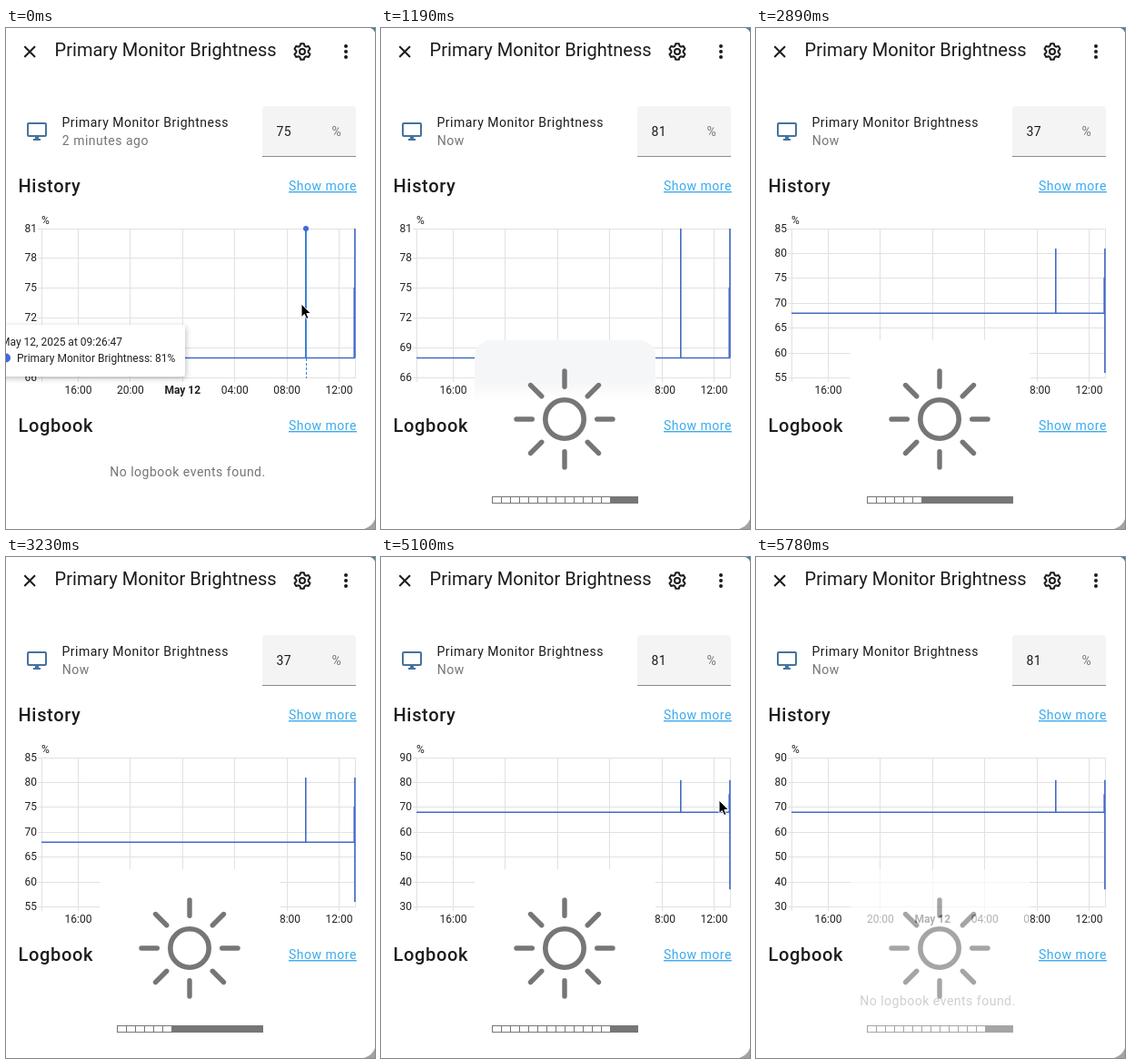
An HTML page that plays this animation: 406x552 px, repeating every 5.95 s.

```html
<!DOCTYPE html>
<html lang="en">
<head>
<meta charset="utf-8">
<title>Brightness history</title>
<style>
  html, body { margin: 0; width: 100%; height: 100%; overflow: hidden; background: #fff; }
  svg { display: block; width: 406px; height: 552px; font: 14px Roboto, sans-serif; letter-spacing: .5px; fill: #1c1c1c; }
  .title { font-size: 20px; letter-spacing: .02px; }
  .head { font-size: 20px; font-weight: 500; letter-spacing: .65px; }
  .soft { fill: #757575; }
  .link { fill: #3aabee; text-decoration: underline; }
  .small { font-size: 12px; letter-spacing: 0; fill: #222; }
  .mid { text-anchor: middle; }
  .end { text-anchor: end; }
  .bold { font-weight: 700; }
  .grid { stroke: #e1e1e1; fill: none; }
  .line { stroke: #4269c8; stroke-width: 1.6; fill: none; }
  .icon { stroke: #1c1c1c; stroke-width: 2; fill: none; }
</style>
</head>
<body>
<svg viewBox="0 0 406 552">
  <defs>
    <linearGradient id="frost" x1="0" y1="344" x2="0" y2="412" gradientUnits="userSpaceOnUse">
      <stop offset=".65" stop-color="#f5f6f7"/>
      <stop offset="1" stop-color="#fff"/>
    </linearGradient>
    <filter id="shadow" x="-10%" y="-25%" width="120%" height="160%">
      <feDropShadow dx="1" dy="2" stdDeviation="3" flood-opacity=".25"/>
    </filter>
  </defs>

  <rect width="406" height="552" fill="#fff"/>
  <path d="M401 0Q405 1.5 406 5V0Z" fill="#4583a0"/>
  <path d="M406 541Q403 549 394 552H406Z" fill="#a3a3a3"/>

  <path class="icon" d="M20.3 20.3L32 32M32 20.3L20.3 32"/>
  <text class="title" x="53.6" y="31">Primary Monitor Brightness</text>
  <g class="icon" transform="translate(326 26)">
    <path id="cog" stroke-linejoin="round"/>
    <circle r="3"/>
  </g>
  <circle cx="374" cy="20" r="2"/>
  <circle cx="374" cy="26" r="2"/>
  <circle cx="374" cy="32" r="2"/>

  <g fill="none" stroke="#44739e" stroke-width="2">
    <rect x="24" y="105" width="20" height="14" rx="1"/>
    <path d="M34 119V123M30 123H38" />
    <path d="M34 120V123" stroke-width="4"/>
  </g>
  <text x="61.5" y="109">Primary Monitor Brightness</text>
  <text id="ago" class="soft" x="61.8" y="129"></text>
  <path d="M282 141V90Q282 86 286 86H381Q385 86 385 90V141Z" fill="#f4f4f4"/>
  <path d="M282 141.5H385" stroke="#8c8c8c"/>
  <text id="value" x="297.5" y="119"></text>
  <text class="soft" x="358.5" y="119">%</text>

  <text class="head" x="13.5" y="181">History</text>
  <text class="link" x="311" y="179">Show more</text>
  <text class="small" x="39" y="216">%</text>
  <g id="times"></g>
  <g id="chart"></g>
  <text class="head" x="13.5" y="445">Logbook</text>
  <text class="link" x="311" y="443">Show more</text>
  <text class="soft mid" x="200" y="494">No logbook events found.</text>

  <g id="tip">
    <path d="M330 221V364" stroke="#2f83d6" stroke-width="1.6"/>
    <path d="M330.5 364V386" stroke="#2f83d6" stroke-dasharray="3 2"/>
    <circle cx="330" cy="221" r="3" fill="#4269d8"/>
    <rect x="-16" y="327" width="213" height="57" rx="4" fill="#fff" filter="url(#shadow)"/>
    <text class="small" x="-6" y="350">May 12, 2025 at 09:26:47</text>
    <circle cx="0" cy="363.5" r="5" fill="#4269d8"/>
    <text class="small" x="12" y="368">Primary Monitor Brightness: 81%</text>
  </g>

  <g id="osd">
    <rect id="panel" x="103" y="344" width="199" height="199" rx="18"/>
    <circle cx="202" cy="431" r="21.2" fill="none" stroke="#767676" stroke-width="5.6"/>
    <path id="rays" transform="translate(202 431)" stroke="#767676" stroke-width="5.4" stroke-linecap="round"/>
    <rect x="122" y="516" width="161" height="8" fill="#767676"/>
    <g id="cells"></g>
  </g>

  <path id="cursor" d="M0 0V14.6L3.3 11.5L5.6 16.6L8 15.6L5.8 10.6H10.4Z" fill="#000" stroke="#fff"/>
</svg>

<script>
const $ = id => document.getElementById(id);
const range = n => [...Array(n).keys()];
const TICK = 170, LOOP = 5950;
const LEFT = 39, RIGHT = 385, TOP = 221, BOTTOM = 385.5;

// Axis limits, label step and lowest value plotted at the right edge
const charts = [
  { min: 66, max: 81, step: 3, low: 68 },
  { min: 55, max: 85, step: 5, low: 56 },
  { min: 30, max: 90, step: 10, low: 37 }
];

// [tick, changed properties]
const steps = [
  [0, { value: 75, ago: '2 minutes ago', level: 13, osd: 0, chart: 0, cursor: [325, 304], tip: 1 }],
  [1, { cursor: [349, 336], tip: .5 }],
  [2, { cursor: [380, 398], tip: 0 }],
  [3, { cursor: null, osd: 1 }],
  [7, { value: 81, ago: 'Now' }],
  [9, { level: 12 }],
  [10, { value: 75 }],
  [11, { level: 11 }],
  [12, { value: 69 }],
  [13, { level: 10 }],
  [14, { value: 62 }],
  [15, { level: 9, value: 56 }],
  [16, { level: 7, value: 50, chart: 1 }],
  [17, { level: 6, value: 37 }],
  [20, { chart: 2 }],
  [21, { level: 7 }],
  [23, { level: 8, value: 43 }],
  [24, { level: 9, value: 50 }],
  [25, { level: 10, value: 56 }],
  [26, { level: 12, value: 62 }],
  [27, { level: 13, value: 75 }],
  [28, { value: 81 }],
  [30, { cursor: [372, 268] }],
  [31, { cursor: [386, 240] }],
  [32, { cursor: [401, 205] }],
  [33, { cursor: null, osd: .9 }],
  [34, { osd: .65 }]
];

const polar = (r, deg) => {
  const a = deg * Math.PI / 180;
  return `${(r * Math.sin(a)).toFixed(2)} ${(-r * Math.cos(a)).toFixed(2)}`;
};

function drawStatic() {
  const teeth = range(6).flatMap(i =>
    [[6.6, -23], [9, -11], [9, 11], [6.6, 23]].map(([r, a]) => polar(r, i * 60 + a)));
  $('cog').setAttribute('d', `M${teeth.join('L')}Z`);
  $('rays').setAttribute('d', range(8).map(i => `M${polar(35.7, i * 45)}L${polar(53, i * 45)}`).join(''));
  $('times').innerHTML = ['16:00', '20:00', 'May 12', '04:00', '08:00', '12:00'].map((label, i) => {
    const x = 79.5 + i * 57.4;
    return `<path class="grid" d="M${Math.floor(x) + .5} ${TOP}V390"/>
      <text class="small mid ${i === 2 ? 'bold' : ''}" x="${x}" y="403">${label}</text>`;
  }).join('');
}

function chartMarkup({ min, max, step, low }) {
  const y = v => BOTTOM - (v - min) / (max - min) * (BOTTOM - TOP);
  const rows = range((max - min) / step + 1).map(i => {
    const v = min + i * step, at = y(v);
    return `<path class="grid" d="M${LEFT - 4} ${Math.floor(at) + .5}H${RIGHT}"/>
      <text class="small end" x="34" y="${at + 3.5}">${v}</text>`;
  });
  return rows.join('') +
    `<path class="grid" d="M39.5 ${TOP}V390M384.5 ${TOP}V${BOTTOM}"/>
    <path class="line" d="M${LEFT} ${y(68)}H329.8V${y(81)}V${y(68)}H383.2V${y(75)}H383.9V${y(81)}V${y(low)}"/>`;
}

const stateAt = tick => Object.assign({}, ...steps.filter(s => s[0] <= tick).map(s => s[1]));

function render(s) {
  $('value').textContent = s.value;
  $('ago').textContent = s.ago;
  $('chart').innerHTML = chartMarkup(charts[s.chart]);
  $('tip').setAttribute('opacity', s.tip);
  $('osd').setAttribute('opacity', s.osd);
  $('panel').setAttribute('fill', s.chart ? '#fff' : 'url(#frost)');
  $('cells').innerHTML = range(s.level).map(i =>
    `<rect x="${123 + i * 10}" y="517" width="9" height="6" fill="#fff"/>`).join('');
  $('cursor').setAttribute('visibility', s.cursor ? 'visible' : 'hidden');
  if (s.cursor) $('cursor').setAttribute('transform', `translate(${s.cursor})`);
}

let shown = -1;
function frame() {
  const tick = Math.floor(performance.now() % LOOP / TICK);
  if (tick !== shown) render(stateAt(shown = tick));
  requestAnimationFrame(frame);
}

drawStatic();
frame();
</script>
</body>
</html>
```
